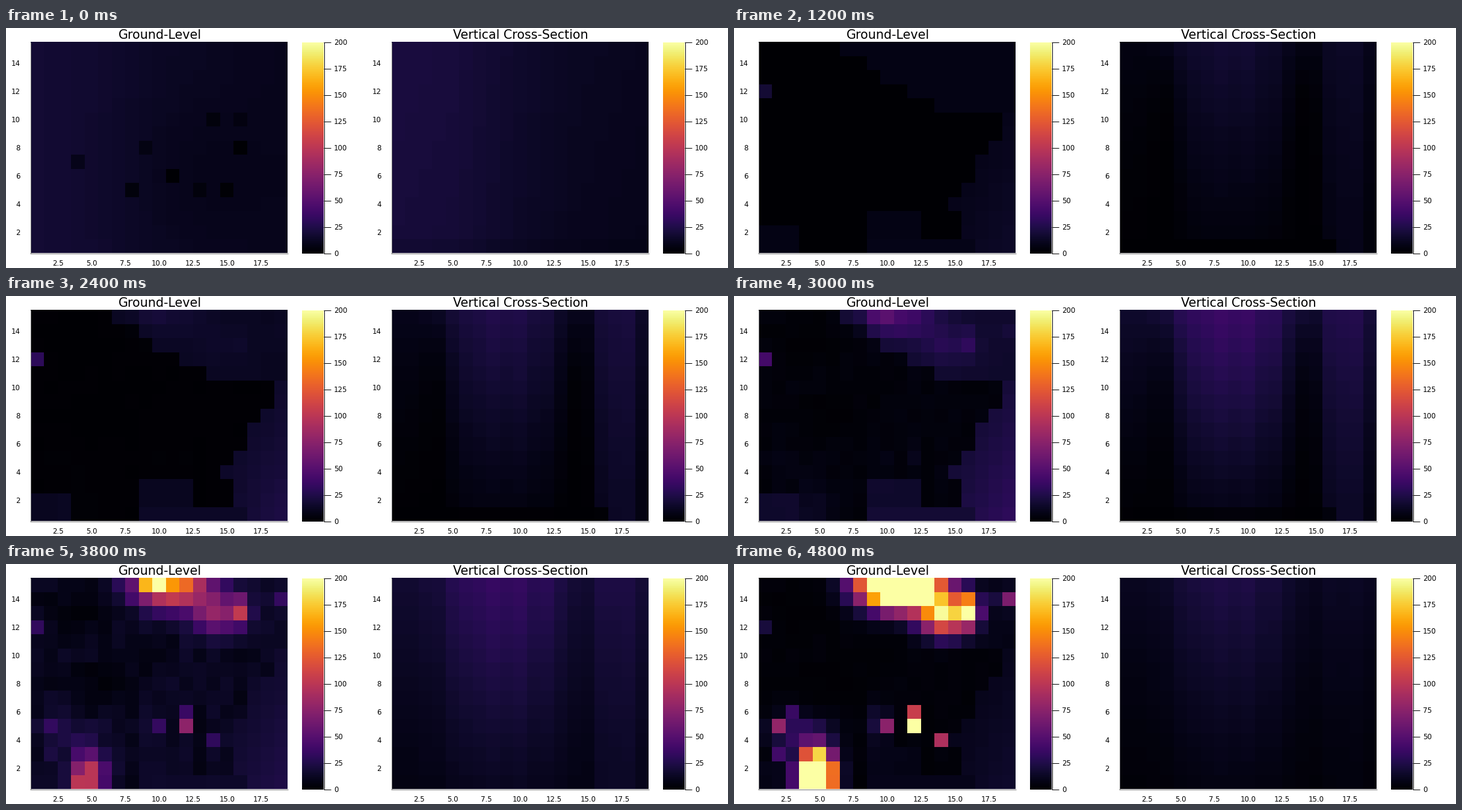
Write a matplotlib script that moves like this. It is 1200 by 400 pixels and loops after 5000 ms.

```python
import matplotlib.pyplot as plt
import numpy as np
from matplotlib.animation import FuncAnimation

W, H, DPI = 1200, 400, 100
COLS, ROWS = 19, 15
FRAMES, STEP = 25, 200
LEFT, RIGHT, TOP, BOTTOM = 41, 468.5, 23.5, 375.5
PX = 72 / DPI

col = np.arange(1, COLS + 1)
row = np.arange(1, ROWS + 1)[:, None]
height = (row - 1) / (ROWS - 1)
rng = np.random.default_rng(5)
grain = 1 + rng.uniform(-0.4, 0.4, (ROWS, COLS))
streaks = 1 + rng.uniform(-0.08, 0.08, COLS)

# Levels that drift between key times.
KEYS = (0, 1400, 2400, 3000, 3800, 4400, 4800)
DRIFT = {
    "base": (0, 0, 1, 4, 11, 10, 3),
    "flow": (11, 11, 18, 24, 19, 17, 12),
    "low": (1, 1, 1, 2, 7, 7, 3),
    "high": (6, 6, 9, 15, 17, 16, 11),
    "core": (11, 11, 15, 20, 16, 13, 12),
    "east": (8, 8, 13, 12, 7, 5, 2),
    "gaps": (0.95, 0.95, 0.8, 0.6, 0, 0, 0),
}


def level(name, t):
    return np.interp(t, KEYS, DRIFT[name])


def growth(t):
    return 1.1 / (1 + np.exp(-(t - 4130) / 400))


def blob(x, y, peak, sx, sy):
    return peak * np.exp(-((col - x) / sx) ** 2 - ((row - y) / sy) ** 2)


def ridge(x, width, power):
    return np.exp(-np.abs((col - x) / width) ** power)


def inflow_mask():
    """Relative inflow along the stepped eastern border and the southern edge."""
    starts = np.array([17, 16, 16, 15, 16, 17, 17, 18, 19, 19, 14, 12, 10, 9, 7])[:, None]
    south = np.interp(col, (14, 19), (0.75, 1.2)) * (1.1 - 0.04 * row)
    mask = np.where(col >= starts, np.where(row > 10, 0.65, south), 0)
    mask[:3, 8:12] = 0.65
    mask[0, 8:16] = 0.75
    mask[:2, :3] = 0.65
    mask[11, 0] = 1.7
    return mask


def ground_start():
    grid = np.interp(col, (1, 5, 10, 19), (18, 16.5, 13, 10)) - blob(13, 6, 3, 5, 5)
    for x, y, value in ((16, 8, 0), (11, 6, 0), (15, 5, 2), (8, 5, 4), (13, 5, 4),
                        (14, 10, 4), (16, 10, 6), (9, 8, 7), (4, 7, 9)):
        grid[y - 1, x - 1] = value
    return grid


def section_start():
    grid = np.interp(col, (1, 5, 10, 14, 19), (21, 20, 14.5, 11.5, 10)) + 0.12 * (row - 8)
    grid[0] *= 0.88
    return grid


MASK = inflow_mask()
GROUND_START, SECTION_START = ground_start(), section_start()
HAZE = grain * (1 - blob(6, 8, 0.7, 2.5, 1.8) - blob(4, 13, 0.7, 2.5, 1.8))
NORTH = (blob(10.9, 15, 420, 2.6, 1.5) + blob(9.5, 15.2, 400, 0.7, 0.6)
         + blob(14.2, 13, 190, 1.7, 1.4) + blob(16, 13.2, 210, 0.7, 0.95)
         + blob(19, 14, 65, 0.8, 0.6))
WEST = blob(4.8, 1.5, 480, 1.15, 1.6) + blob(4, 1, 150, 0.4, 0.4)
DRIZZLE = blob(3.5, 4.5, 35, 2.2, 1.2) + blob(9.4, 5.2, 25, 0.8, 1.3)
SPARKS = sum(blob(x, y, peak, 0.4, 0.4) for x, y, peak in (
    (12, 5, 310), (12, 6, 115), (14, 4, 100), (10, 5, 65),
    (2, 5, 65), (3, 6, 30), (2, 3, 35)))


def ground_at(t):
    g = growth(t)
    grid = np.maximum(level("base", t) * HAZE, level("flow", t) * MASK)
    return grid + g * (NORTH + DRIZZLE) + g ** 1.4 * (WEST + SPARKS)


def section_at(t):
    low, high = level("low", t), level("high", t)
    grid = low + (high - low) * height ** 1.3
    grid = grid + level("core", t) * ridge(8.5, 4.2, 4) * (0.3 + 0.7 * height)
    grid = grid + level("east", t) * ridge(17.3, 1.8, 4)
    gaps = level("gaps", t)
    grid *= 1 - gaps * (ridge(3.7, 1.2, 2) + ridge(14.2, 1.1, 2)) * (1 - height ** 4)
    grid[0, :16] *= 1 - gaps
    return grid * streaks


fig = plt.figure(figsize=(W / DPI, H / DPI), dpi=DPI, facecolor="white")
ax = fig.add_axes((0, 0, 1, 1))
ax.axis("off")


def label(x, baseline, text, size=11.7, ha="center"):
    ax.text(x, baseline, text, fontsize=size * PX, ha=ha, va="baseline",
            family="DejaVu Sans", color="black")


def line(xs, ys, color="black"):
    ax.plot(xs, ys, color=color, lw=PX, solid_capstyle="butt")


def heat(data, xs, ys):
    return ax.pcolormesh(xs, ys, data, cmap="inferno", vmin=0, vmax=200,
                         antialiased=False, edgecolors="none")


def panel(x0, title):
    left, right = x0 + LEFT, x0 + RIGHT
    xs = np.floor(np.linspace(left, right, COLS + 1))
    ys = np.floor(np.linspace(BOTTOM, TOP, ROWS + 1) + 0.49)
    image = heat(np.zeros((ROWS, COLS)), xs, ys)
    line((left - 0.5, left - 0.5), (TOP, BOTTOM + 0.5), "#777777")
    line((left - 1, right), (BOTTOM, BOTTOM), "#777777")
    label((left + right) / 2 + 0.7, 18, title, 20.6)
    for value in np.arange(2.5, 18, 2.5):
        label(left + (value - 0.5) * (right - left) / COLS, 396.5, f"{value:.1f}")
    for value in range(2, 15, 2):
        y = BOTTOM - (value - 0.5) * (BOTTOM - TOP) / ROWS
        label(x0 + 23.5, y + 4.3, str(value), ha="right")
    heat(np.linspace(0, 200, 256)[:, None], (x0 + 492, x0 + 528),
         np.linspace(BOTTOM, TOP, 257))
    line((x0 + 528.5, x0 + 528.5), (TOP, BOTTOM + 0.5))
    for value in range(0, 201, 25):
        y = BOTTOM - value / 200 * (BOTTOM - TOP)
        line((x0 + 528, x0 + 540), (y, y))
        label(x0 + 545, y + 4, str(value), ha="left")
    return image


ground_image = panel(0, "Ground-Level")
section_image = panel(600, "Vertical Cross-Section")
ax.set_xlim(0, W)
ax.set_ylim(H, 0)


def draw(frame):
    t = frame * STEP
    fade = max(0, 1 - t / 600) ** 2.4
    ground_image.set_array(fade * GROUND_START + (1 - fade) * ground_at(t))
    section_image.set_array(fade * SECTION_START + (1 - fade) * section_at(t))
    return ground_image, section_image


anim = FuncAnimation(fig, draw, frames=FRAMES, interval=STEP, repeat=True, repeat_delay=0)
plt.show()
```
